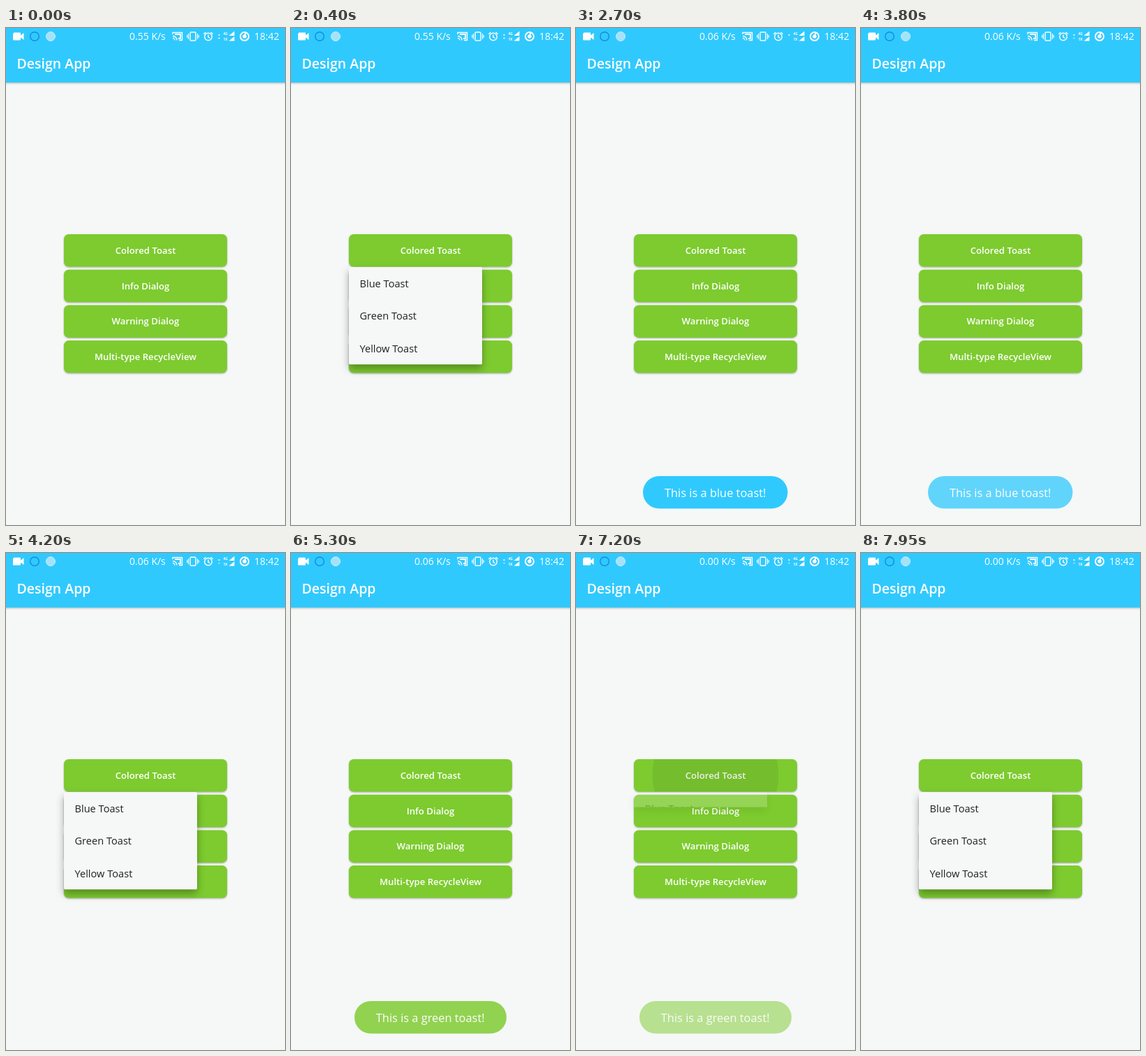
Recreate the animation shown at these times as an HTML page. Size 400x711 px, loop 8000 ms.

```html
<!DOCTYPE html>
<html lang="en">
<head>
<meta charset="utf-8">
<title>Design App</title>
<style>
  html, body { margin: 0; width: 100%; height: 100%; overflow: hidden; background: #f5f8f6; }
  svg { display: block; width: 100%; height: 100%; }
  text { font-family: "Open Sans", "Noto Sans", sans-serif; fill: #fff; }
  .status { font-size: 14px; }
  .title { font-size: 19.5px; font-weight: 600; }
  .button text { font-size: 13.2px; font-weight: 600; text-anchor: middle; }
  .button rect { fill: #7dcb2f; filter: drop-shadow(0 1.5px 1.2px rgba(0, 0, 0, .3)); }
  .bar { fill: #30c9fe; filter: drop-shadow(0 1.5px 1.5px rgba(0, 0, 0, .28)); }
  .menu { filter: drop-shadow(0 6px 6px rgba(0, 0, 0, .32)); }
  .menu text { font-size: 14.6px; fill: #202220; }
  .toast text { font-size: 16.4px; text-anchor: middle; }
  .line { fill: none; stroke: #fff; stroke-width: 1.4; }
  .tiny { font-size: 5px; font-weight: 700; }
</style>
</head>
<body>
<svg viewBox="0 0 400 711">
  <defs>
    <clipPath id="buttonClip"><rect x="83" y="295" width="234" height="46.5" rx="7"/></clipPath>
    <clipPath id="rowClip"><rect x="83" y="342" width="191" height="46.5"/></clipPath>
    <clipPath id="menuClip"><rect id="reveal" x="83" y="342" width="191" height="139.5"/></clipPath>
  </defs>

  <rect width="400" height="711" fill="#f5f8f6"/>
  <rect class="bar" x="-5" y="-5" width="410" height="83"/>
  <text class="title" x="15.5" y="58">Design App</text>

  <!-- status bar -->
  <path fill="#fff" d="M11 6.5h9q1 0 1 1v3l4.500-3.500v10l-4.500-3.500v3q0 1-1 1h-9q-1 0-1-1v-8q0-1 1-1z"/>
  <circle cx="41" cy="12" r="6.300" fill="none" stroke="#168bdc" stroke-width="1.400"/>
  <circle cx="64" cy="12" r="6.500" fill="#a5e2fa" stroke="#c6edfc"/>
  <text id="speed" class="status" x="177" y="17"></text>
  <g class="line">
    <path d="M239 9V6.500h13.500v11H248M239 11.500a6 6 0 0 1 6 6M239 14.500a3 3 0 0 1 3 3"/>
    <path d="M242 9h8v6h-3" stroke-width="1.800"/>
    <rect x="264" y="6" width="8" height="12" rx="1.200"/>
    <path d="M261.500 8v8M274.500 8v8M259.800 10v4M276.200 10v4" stroke-width="1.100"/>
    <circle cx="290" cy="12.500" r="5.300"/>
    <path d="M290 9.500v3.500l2.500 1.500M283.300 8.800l3.200-2.800M296.700 8.800l-3.200-2.800"/>
    <circle cx="342" cy="12" r="6" stroke-width="2"/>
  </g>
  <circle cx="342" cy="12" r="2.800" fill="#fff"/>
  <path fill="#fff" d="M342 5.500l3.500 1.500l-3.500 4z"/>
  <circle cx="305.500" cy="10" r="1.100" fill="#fff"/>
  <circle id="dot" cx="305.500" cy="14.500" r="1.100" fill="#fff"/>
  <text class="tiny" x="311.500" y="9.800">4G</text>
  <text class="tiny" x="311.500" y="18">1X</text>
  <path fill="#fff" d="M327.500 4.500v6.500h-8zM327.500 12v6.500h-8z"/>
  <text class="status" x="356" y="17">18:42</text>

  <g id="buttons"></g>
  <g clip-path="url(#buttonClip)"><circle id="press" cx="200" cy="318"/></g>

  <g id="menu" class="menu">
    <g clip-path="url(#menuClip)">
      <rect x="83" y="342" width="191" height="139.500" rx="2" fill="#f5f8f6"/>
      <g id="row" clip-path="url(#rowClip)">
        <rect x="83" y="342" width="191" height="46.500" fill-opacity=".09"/>
        <circle id="ripple" cx="215" cy="365" fill-opacity=".06"/>
      </g>
      <text x="98.500" y="370.700">Blue Toast</text>
      <text x="98.500" y="417.200">Green Toast</text>
      <text x="98.500" y="463.700">Yellow Toast</text>
    </g>
  </g>

  <g id="blue" class="toast">
    <rect x="96" y="641" width="207.500" height="46.500" rx="23.250" fill="#30c9fe"/>
    <text x="199.700" y="670.800">This is a blue toast!</text>
  </g>
  <g id="green" class="toast">
    <rect x="91" y="641" width="218" height="46.500" rx="23.250" fill="#7dcb2f"/>
    <text x="199.700" y="670.800">This is a green toast!</text>
  </g>
</svg>
<script>
const LOOP = 8000, STEP = 50;
const $ = id => document.getElementById(id);
const set = (id, attrs) => {
  for (const key in attrs) $(id).setAttribute(key, attrs[key]);
};
const ramp = (t, start, length) => Math.min(1, Math.max(0, (t - start) / length));
const easeOut = p => 1 - (1 - p) ** 2;

// Each menu visit: button press, item tap, height of the tapped row.
const visits = [
  { open: 0, tap: 1400, row: 342 },
  { open: 3810, tap: 4850, row: 388.5 },
  { open: 7060, tap: Infinity, row: 342 }
];
const toasts = [
  { id: "blue", show: 1570, hide: 3550 },
  { id: "green", show: 5010, hide: 6850 }
];
const speeds = [[5700, "0.00"], [2700, "0.06"], [0, "0.55"]];

$("buttons").innerHTML = ["Colored Toast", "Info Dialog", "Warning Dialog", "Multi-type RecycleView"]
  .map((label, i) => {
    const y = 295 + i * 50.7;
    return `<g class="button"><rect x="83" y="${y}" width="234" height="46.5" rx="7"/>
      <text x="200" y="${y + 28}">${label}</text></g>`;
  }).join("");

function drawMenu(t) {
  const { open, tap, row } = visits.filter(v => t >= v.open).pop();
  const press = ramp(t, open, 350);
  set("press", { r: 20 + 110 * easeOut(press), "fill-opacity": press ? .12 * (1 - press) : 0 });

  const fadeIn = ramp(t, open + 120, 100), fadeOut = ramp(t, tap + 100, 300);
  set("menu", { opacity: fadeIn * (1 - fadeOut) });
  set("reveal", { height: 139.5 * easeOut(ramp(t, open + 120, 250)) });

  const since = t - tap;
  set("row", {
    opacity: since >= 0 ? 1 : 0,
    transform: `translate(0 ${row - 342})`
  });
  set("ripple", { r: 15 + 120 * ramp(since, 0, 600) });
}

function draw(t) {
  drawMenu(t);
  for (const { id, show, hide } of toasts) {
    const alpha = easeOut(ramp(t, show, 500)) * (1 - ramp(t, hide, 500) ** 2);
    set(id, { opacity: alpha });
  }
  $("speed").textContent = speeds.find(([from]) => t >= from)[1] + " K/s";
  set("dot", { opacity: t < 900 ? 1 : t < 3550 ? 0 : .6 });
}

const begin = performance.now();
function tick() {
  const t = (performance.now() - begin) % LOOP;
  draw(Math.floor(t / STEP) * STEP);
  requestAnimationFrame(tick);
}
tick();
</script>
</body>
</html>
```
